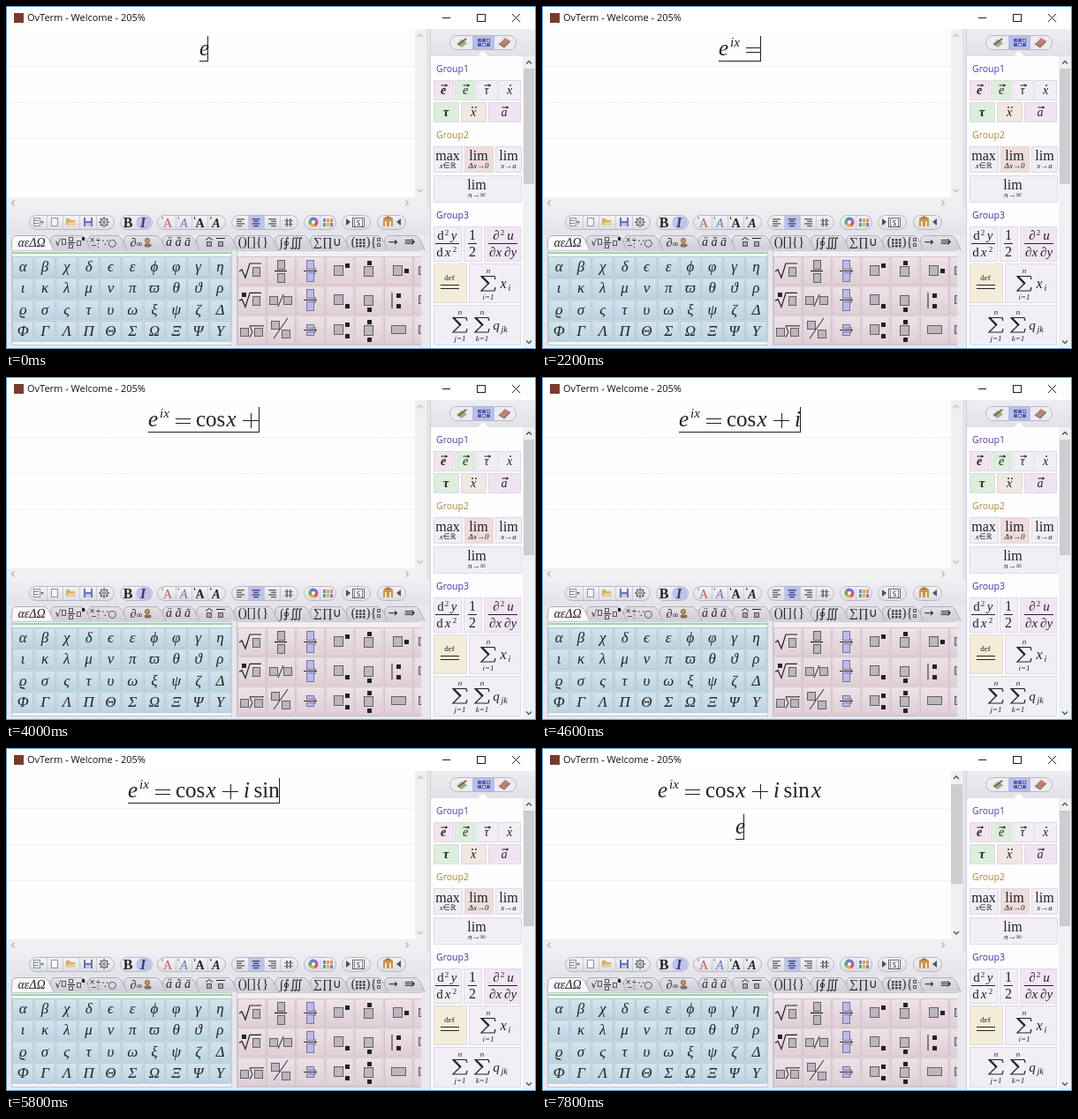
Animation of 600 by 389 pixels, one loop 8000 ms. Source, as an HTML page with a canvas:

```html
<!DOCTYPE html>
<html lang="en">
<head>
<meta charset="utf-8">
<title>Formula editor</title>
<style>
html, body { margin: 0; width: 100%; height: 100%; overflow: hidden; background: #fff; }
canvas { display: block; width: 600px; height: 389px; }
</style>
</head>
<body>
<canvas id="stage" width="600" height="389"></canvas>
<script>
const W = 600, H = 389, LOOP = 8000;
const SERIF = '"Liberation Serif", "Noto Serif", "DejaVu Sans", serif';
const SANS = '"Open Sans", "Noto Sans", sans-serif';
const SYMBOL = '"DejaVu Sans", sans-serif';
const INK = '#222';
const stage = document.getElementById('stage').getContext('2d');
let g = stage;

function box(x, y, w, h, fill, line) {
  if (fill) { g.fillStyle = fill; g.fillRect(x, y, w, h); }
  if (line) { g.strokeStyle = line; g.lineWidth = 1; g.strokeRect(x + .5, y + .5, w - 1, h - 1); }
}
function path(points, color = INK, width = 1, fill) {
  g.beginPath();
  for (let i = 0; i < points.length; i += 2) g.lineTo(points[i], points[i + 1]);
  if (fill) { g.fillStyle = fill; g.fill(); }
  else { g.strokeStyle = color; g.lineWidth = width; g.stroke(); }
}
function disc(x, y, r, fill, line) {
  g.beginPath();
  g.arc(x, y, r, 0, 7);
  if (fill) { g.fillStyle = fill; g.fill(); }
  if (line) { g.strokeStyle = line; g.lineWidth = 1; g.stroke(); }
}
function round(x, y, w, h, r, fill, line) {
  g.beginPath();
  g.roundRect(x + .5, y + .5, w - 1, h - 1, r);
  g.fillStyle = fill; g.fill();
  if (line) { g.strokeStyle = line; g.lineWidth = 1; g.stroke(); }
}
function text(s, x, y, font, color = INK, align = 'left') {
  g.font = font; g.fillStyle = color; g.textAlign = align;
  g.fillText(s, x, y);
}
const math = (s, x, y, size, style = '', align = 'center', color = INK) =>
  text(s, x, y, `${style} ${size}px ${SERIF}`, color, align);
const ital = (s, x, y, size, align) => math(s, x, y, size, 'italic', align);
function shade(y, h, a, b) {
  const s = g.createLinearGradient(0, y, 0, y + h);
  s.addColorStop(0, a); s.addColorStop(1, b);
  return s;
}
// Chevron pointing along (dx, dy)
function chevron(x, y, dx, dy, color) {
  const k = 3;
  path([x - k * dx / 2 - k * dy, y - k * dy / 2 - k * dx, x + k * dx / 2, y + k * dy / 2,
    x - k * dx / 2 + k * dy, y - k * dy / 2 + k * dx], color, 1.3);
}

function titleBar() {
  box(0, 0, W, H, '#ebebf0');
  box(0, 0, W, 26, '#fff');
  box(9, 8, 11, 11, '#7a3a2c');
  text('OvTerm - Welcome - 205%', 24, 17, `11px ${SANS}`, '#111');
  path([494, 13.5, 503, 13.5]);
  box(533, 9, 10, 9, null, INK);
  path([573, 9, 582, 18]);
  path([582, 9, 573, 18]);
}

function editor() {
  box(1, 26, 462, 191, '#fefdff');
  g.setLineDash([1, 1]);
  for (let y = 68.5; y < 160; y += 41) path([1, y, 462, y], '#e6e5ec');
  g.setLineDash([]);
  box(1, 217, 475, 14, '#f0f0f0');
  chevron(8, 223.5, -1, 0, '#b4b4b4');
  chevron(454, 223.5, 1, 0, '#b4b4b4');
  box(476, 26, 5, 205, '#e4e3ea');
  path([480.5, 26, 480.5, 388], '#d0d0d8');
}

function page(x, y) {
  box(x - 4, y - 5, 8, 10, '#f8f8f8', '#8c939c');
}
function toolbar() {
  box(1, 231, 479, 28, shade(231, 28, '#efeff3', '#e2e2e9'));
  for (const [x, w] of [[26, 97], [129, 37], [171, 78], [255, 76], [337, 37], [380, 33], [420, 33]])
    round(x, 237, w, 17, 8, shade(237, 17, '#f4f4f7', '#dcdce4'), '#b8b8c2');
  for (const x of [46, 64, 83, 102, 192, 210, 228, 274, 292, 310, 355])
    path([x + .5, 238, x + .5, 253], '#cbcbd4');
  page(35, 245); path([39, 244, 43, 244, 41, 247], 0, 0, '#777');
  box(32, 243, 5, 1, '#6b9a78'); box(32, 246, 5, 1, '#6b9a78');
  page(55, 245);
  path([68, 249, 68, 241, 72, 241, 73, 243, 78, 243, 78, 249], 0, 0, '#d8ae62');
  path([68, 249, 71, 245, 80, 245, 77, 249], 0, 0, '#ecd296');
  box(88, 240, 10, 10, '#6a72b4'); box(90, 240, 6, 4, '#eef0ff'); box(90, 246, 6, 4, '#c4c9ee');
  disc(111, 245, 4, null, '#555'); disc(111, 245, 1.5, null, '#555');
  for (let i = 0; i < 8; i++) {
    const c = Math.cos(i * Math.PI / 4), s = Math.sin(i * Math.PI / 4);
    path([111 + 4 * c, 245 + 4 * s, 111 + 5.7 * c, 245 + 5.7 * s], '#555', 1.5);
  }
  round(147, 238, 18, 15, 6, '#bfc2ea');
  math('B', 138, 251, 16, 'bold');
  math('I', 155, 251, 16, 'bold italic', 'center', '#333a78');
  [['#b66058', ''], ['#6078b0', 'italic'], [INK, 'bold'], [INK, 'bold italic']].forEach(([c, s], i) => {
    math('A', 183 + i * 18.3, 251, 14, s, 'center', c);
    path([177 + i * 18.3, 239, 177 + i * 18.3, 242], c);
  });
  box(275, 238, 17, 15, '#bfc2ea');
  [265, 283, 301].forEach((x, i) => {
    for (let j = 0; j < 4; j++) {
      const w = j % 2 ? 6 : 9;
      const left = i == 0 ? x - 4 : i == 2 ? x + 5 - w : x - w / 2;
      box(left, 241 + j * 2.6, w, 1.4, i == 1 ? '#3d4686' : '#666');
    }
  });
  for (const y of [243, 247]) box(315, y, 10, 1, '#777');
  for (const x of [317, 321]) box(x, 241, 2, 9, '#777');
  ['#d85757', '#e2ac45', '#62ac61', '#557fc8', '#956ac0'].forEach((c, i) => {
    const a = i * Math.PI * .4;
    g.beginPath(); g.moveTo(348, 245); g.arc(348, 245, 5.5, a, a + Math.PI * .4);
    g.fillStyle = c; g.fill();
  });
  disc(348, 245, 2, '#fff');
  ['#7a82d0', '#e2a14b', '#df8d6b', '#68a479', '#d5bc55', '#8c77bd'].forEach((c, i) =>
    box(359 + i % 3 * 4, 241 + (i / 3 | 0) * 5, 3, 4, c));
  path([385, 241, 390, 245, 385, 249], 0, 0, '#46505f');
  box(392, 240, 14, 11, '#fff', '#606878');
  text('[$]', 399, 249, `8px ${SYMBOL}`, '#444', 'center');
  box(427, 241, 11, 9, '#c9964f'); box(429, 244, 2, 6, '#f7e6c4'); box(434, 244, 2, 6, '#f7e6c4');
  path([427, 241, 432.5, 238, 438, 241], 0, 0, '#b5763e');
  path([447, 241, 442, 245, 447, 249], 0, 0, '#555');
}

function tabs() {
  box(1, 259, 479, 129, '#e8e8ee');
  const edges = [6, 50, 92, 133, 177, 215, 258, 304, 344, 385, 428, 470];
  for (let i = 10; i >= 0; i--) {
    const a = edges[i], b = edges[i + 1];
    const shape = [a, 276.5, a + 1, 263, a + 4, 260.5, b - 6, 260.5, b - 2, 264, b + 4, 276.5];
    path(shape, 0, 0, i ? shade(260, 16, '#e4e3e9', '#cfced6') : '#f8f8fb');
    path(shape, '#aeadb8');
  }
  ital('αεΔΩ', 29, 273, 14);
  text('√', 59, 272, `11px ${SYMBOL}`, INK, 'center');
  box(63, 264, 5, 7, null, '#555');
  box(71, 262, 5, 5, null, '#555'); path([70, 268.5, 78, 268.5]); box(71, 270, 5, 5, null, '#555');
  box(80, 266, 5, 6, null, '#555'); box(86, 262, 3, 4, INK);
  text('×÷', 101, 268, `8px ${SYMBOL}`, INK, 'center');
  text('−:', 101, 274, `8px ${SYMBOL}`, INK, 'center');
  text('∵○', 117, 272, `11px ${SYMBOL}`, INK, 'center');
  ital('∂', 144, 273, 14);
  text('∞', 151, 273, `9px ${SYMBOL}`, INK, 'center');
  disc(160, 266, 2.5, '#d79d4e', '#7b5336'); round(156, 269, 9, 5, 2, '#8a6a5c');
  ital('ä ã ā', 195, 272, 14);
  path([226, 265.5, 230, 262.5, 234, 265.5]);
  path([238, 263.5, 248, 263.5]);
  for (const x of [230, 243]) box(x - 3, 267, 6, 6, '#a9a6ad', '#555');
  math('()[]{}', 280, 272, 15);
  math('∫∮∭', 323, 273, 14);
  math('∑∏∪', 364, 272, 14);
  math('(', 393, 272, 14);
  for (let i = 0; i < 9; i++) box(396 + i % 3 * 4, 264 + (i / 3 | 0) * 3.5, 2.5, 2.5, '#444');
  math(')', 410, 272, 14); math('{', 416, 272, 14);
  box(420, 263, 4, 4, null, '#555'); box(420, 269, 4, 4, null, '#555');
  text('→', 438, 272, `13px ${SYMBOL}`, INK, 'center');
  text('⇛', 457, 272, `15px ${SYMBOL}`, INK, 'center');
}

function greek() {
  box(6, 277, 250, 108, '#f3f4f7', '#c3c7d0');
  box(7, 279, 248, 2, '#9ad6a2');
  ['αβχδϵεϕφγη', 'ικλμνπϖθϑρ', 'ϱσςτυωξψζΔ', 'ΦΓΛΠΘΣΩΞΨΥ'].forEach((row, r) => {
    const y = 284 + r * 24.3;
    [...row].forEach((c, i) => {
      const x = 7 + i * 24.8;
      box(x, y, 24.3, 23.8, shade(y, 24, '#d5e5ed', '#bcd4e1'), '#b2c8d4');
      ital(c, x + 12.2, y + 17, 17);
    });
  });
}

function templates() {
  g.save();
  g.beginPath(); g.rect(261, 277, 209, 108); g.clip();
  box(261, 277, 220, 108, '#f2eef1', '#cbc3c9');
  const grey = (x, y, w = 10, h = 10) => box(Math.round(x - w / 2), Math.round(y - h / 2), w, h, '#bcb7bd', '#625f65');
  const blue = (x, y, w, h) => box(x, y, w, h, '#bdbbe6', '#7574a8');
  const dot = (x, y) => box(Math.round(x) - 2, Math.round(y) - 2, 5, 5, INK);
  const root = (x, y) => path([x - 12, y + 1, x - 9, y - 1, x - 5, y + 8, x, y - 8, x + 13, y - 8], INK, 1.2);
  const cx = c => 278 + c * 33.2, cy = r => 300 + r * 33.4;
  for (let r = 0; r < 3; r++) for (let c = 0; c < 7; c++) {
    const x = cx(c) - 16, y = cy(r) - 16;
    box(x, y, 32.7, 33, shade(y, 33, '#eee3e8', '#dfced6'), '#d2c2ca');
  }
  for (let r = 0; r < 2; r++) { root(276, cy(r)); grey(283, cy(r) + 1, 9, 11); }
  dot(269, cy(1) - 6);
  grey(270, cy(2) + 3); path([276, cy(2) + 9, 279, cy(2) + 3, 276, cy(2) - 4, 292, cy(2) - 4]); grey(286, cy(2) + 3);
  grey(311, 293, 9, 11); path([304, 300.5, 318, 300.5], INK, 1.3); grey(311, 308, 9, 11);
  grey(303, 334); path([308, 341, 314, 327]); grey(319, 334);
  grey(305, 362); path([303, 377, 319, 354]); grey(317, 372);
  for (let r = 0; r < 3; r++) {
    const x = 344, y = Math.round(cy(r)), h = r == 2 ? 5 : 11;
    blue(x - 4, y - 1 - h, 9, h);
    path([x - 7, y + .5, x + 8, y + .5]);
    blue(x - 4, y + 2, 9, h);
    path([x + 6, y - 3, x + 6, y + 4], '#555');
  }
  for (let r = 0; r < 3; r++) {
    grey(cx(3) - 1, cy(r), 11, 12); grey(cx(4), cy(r) + 1, 11, 12);
    if (r != 1) { dot(cx(3) + 8, cy(r) - 6); dot(cx(4), cy(r) - 9); }
    if (r) { dot(cx(3) + 8, cy(r) + 7); dot(cx(4), cy(r) + 11); }
  }
  grey(cx(5) - 1, 300, 11, 12); dot(cx(5) + 9, 300);
  path([437, 325, 437, 343]); dot(444, 328); dot(444, 340);
  grey(cx(5), cy(2), 17, 10);
  for (let r = 0; r < 3; r++) grey(cx(6) - 2, cy(r), 17, 10);
  g.restore();
}

const LILAC = '#f2eef5', PINK = '#efdcdc', GREEN = '#dcefdc', SAND = '#f3ecd9';
function card(x, y, w, h, fill) {
  box(x, y, w, h, fill, '#dedae4');
}
function vec(x, y) {
  path([x - 3.5, y, x + 3.5, y]);
  path([x + 1.5, y - 1.7, x + 4, y, x + 1.5, y + 1.7], 0, 0, INK);
}
function limit(top, sub, x, y) {
  math(top, x, y, 16); ital(sub, x, y + 9, 9);
}
function sum(x, y, sub) {
  path([x + 8, y - 5, x + 7, y - 8.5, x - 8, y - 8.5, x, y, x - 8, y + 8, x + 7, y + 8, x + 8, y + 4], INK, 1.2);
  path([x - 7, y - 8, x + 1, y], INK, 2);
  ital('n', x, y - 12, 9); ital(sub, x, y + 18, 9);
}
function sidebar() {
  box(481, 26, 118, 31, shade(26, 31, '#efeff2', '#e0e0e6'));
  round(502, 33, 76, 17, 8, '#ececf1', '#b8b8c2');
  box(528, 34, 25, 15, '#b9bde8');
  path([510, 43, 516, 38, 522, 42, 516, 47], 0, 0, '#90b28a');
  path([512, 44, 521, 37], '#8a623d', 2);
  ['#5361b0', '#5361b0', '#fff', '#5361b0', '#fff', '#5361b0'].forEach((c, i) =>
    box(534 + i % 3 * 5, 37 + (i / 3 | 0) * 5, 4, 4, c, '#5361b0'));
  path([558, 43, 565, 36, 571, 40, 564, 47], 0, 0, '#b98273');
  path([558, 43, 564, 47, 571, 40], '#80534c');
  box(481, 57, 104, 331, '#fefdff');
  path([534, 57, 540, 51, 546, 57], 0, 0, '#fefdff');
  box(585, 57, 14, 331, '#f0f0f0');
  box(586, 71, 12, 131, '#cdcdcd');
  chevron(592, 64, 0, -1, '#555');
  chevron(592, 381, 0, 1, '#555');
  [['Group1', 75, '#5a3aa6'], ['Group2', 150, '#a38a3c'], ['Group3', 241, '#40309c']].forEach(([s, y, c]) =>
    text(s, 487, y, `10.5px ${SANS}`, c));

  [[484, 23, '#f3e4ee'], [508, 24, GREEN], [533, 24, LILAC], [558, 25, LILAC]].forEach(([x, w, c]) => card(x, 84, w, 23, c));
  [[484, 29, GREEN], [515, 29, '#f1e8e2'], [546, 37, '#f0e4f3']].forEach(([x, w, c]) => card(x, 109, w, 23, c));
  math('e', 495, 100, 14, 'bold italic'); vec(496, 90);
  ital('e', 520, 100, 14); vec(521, 90);
  ital('τ', 544, 100, 14); vec(545, 90);
  ital('x', 570, 100, 14); disc(571, 90, .9, INK);
  math('τ', 498, 125, 15, 'bold italic');
  ital('x', 529, 125, 14); disc(528, 115, .9, INK); disc(532, 115, .9, INK);
  ital('a', 564, 125, 14); vec(565, 115);

  [[484, 33, LILAC], [519, 33, PINK], [554, 30, LILAC]].forEach(([x, w, c]) => card(x, 159, w, 30, c));
  card(484, 192, 100, 31, LILAC);
  limit('max', 'x∈ℝ', 500, 175);
  limit('lim', 'Δx→0', 535, 175);
  limit('lim', 'x→a', 569, 175);
  limit('lim', 'n→∞', 533, 208);

  [[484, 32], [518, 21], [541, 42]].forEach(([x, w]) => card(x, 250, w, 40, x > 540 ? '#f1e5f4' : LILAC));
  card(484, 292, 38, 45, SAND);
  card(524, 292, 59, 45, LILAC);
  card(484, 339, 99, 46, LILAC);
  path([486, 269.5, 513, 269.5]);
  math('d', 492, 265, 15); math('2', 499, 260, 9); ital('y', 507, 265, 15);
  math('d', 491, 284, 15); ital('x', 500, 284, 15); math('2', 508, 279, 9);
  path([523, 269.5, 533, 269.5]);
  math('1', 528, 265, 16); math('2', 528, 284, 16);
  path([546, 269.5, 579, 269.5]);
  ital('∂', 555, 265, 15); math('2', 562, 260, 9); ital('u', 571, 265, 15);
  ital('∂x', 554, 284, 15); ital('∂y', 571, 284, 15);
  math('def', 502, 311, 9);
  path([492, 316.5, 513, 316.5]); path([492, 320.5, 513, 320.5]);
  sum(546, 315, 'i=1');
  ital('x', 563, 320, 16); ital('i', 570, 323, 10);
  sum(514, 362, 'j=1'); sum(539, 362, 'k=1');
  ital('q', 555, 367, 15); ital('jk', 564, 370, 10);
}

function makeBackdrop() {
  const layer = document.createElement('canvas');
  layer.width = W; layer.height = H;
  g = layer.getContext('2d');
  titleBar(); editor(); toolbar(); tabs(); greek(); templates(); sidebar();
  box(0, 0, W, H, null, '#5b9bc8');
  g = stage;
  return layer;
}

// Keystrokes: time, formula width afterwards
const KEYS = [[0, 10], [600, 20], [1000, 18], [1400, 24], [2000, 48], [2400, 77], [2600, 87], [3000, 100],
  [3800, 126], [4400, 138], [5000, 149], [5200, 157], [5400, 172], [6000, 186]];
// Parts: text, offset, start, end, style, size, rise
const PARTS = [
  ['e', 0, 0, LOOP, 'italic', 25, 0],
  ['i', 13, 1000, 1400, 'italic', 15, 10],
  ['ix', 13, 1400, LOOP, 'italic', 15, 10],
  ['co', 54, 2400, 2600, 'italic', 25, 0],
  ['cos', 54, 2600, LOOP, '', 25, 0],
  ['x', 88.5, 3000, LOOP, 'italic', 25, 0],
  ['i', 131, 4400, LOOP, 'italic', 25, 0],
  ['s', 141, 5000, 5200, 'italic', 25, 0],
  ['si', 141, 5200, 5400, 'italic', 25, 0],
  ['sin', 142.5, 5400, LOOP, '', 25, 0],
  ['x', 174, 6000, LOOP, 'italic', 25, 0]
];
const ENTER = 7000, NEXT = 7600;

function caret(left, right, base, high) {
  box(left, base + 6, right - left + 1, 1, INK);
  box(right, base - 22, 1, high ? 16 : 29, INK);
}
function formula(t) {
  const width = KEYS.filter(k => k[0] <= t).pop()[1];
  const left = Math.round(224 - width / 2), base = 56;
  for (const [s, dx, from, to, style, size, rise] of PARTS)
    if (t >= from && t < to) math(s, left + dx, base - rise, size, style, 'left');
  if (t >= 600 && t < 1000) box(left + 13, base - 17, 6, 8, null, '#888');
  if (t >= 2000) {
    box(left + 31, 47, 17, 1, INK);
    box(left + 31, 52, 17, 1, INK);
  }
  if (t >= 3800) {
    box(left + 107, 49, 18, 1, INK);
    box(left + 116, 41, 1, 17, INK);
  }
  if (t < ENTER) caret(left, left + width - 1, base, t >= 600 && t < 1800);
  else {
    const typed = t >= NEXT;
    if (typed) ital('e', 219, 97, 25, 'left');
    caret(typed ? 219 : 224, typed ? 228 : 224, 97);
  }
}
function scrollbar(on) {
  box(463, 26, 13, 191, '#f0f0f0');
  if (on) box(463, 41, 13, 113, '#cdcdcd');
  const color = on ? '#505050' : '#bfbfbf';
  chevron(469, 33.5, 0, -1, color);
  chevron(469, 209.5, 0, 1, color);
}

const backdrop = makeBackdrop();
function draw(now) {
  const t = now % LOOP;
  g.drawImage(backdrop, 0, 0);
  scrollbar(t >= ENTER);
  formula(t);
  requestAnimationFrame(draw);
}
draw(0);
</script>
</body>
</html>
```
